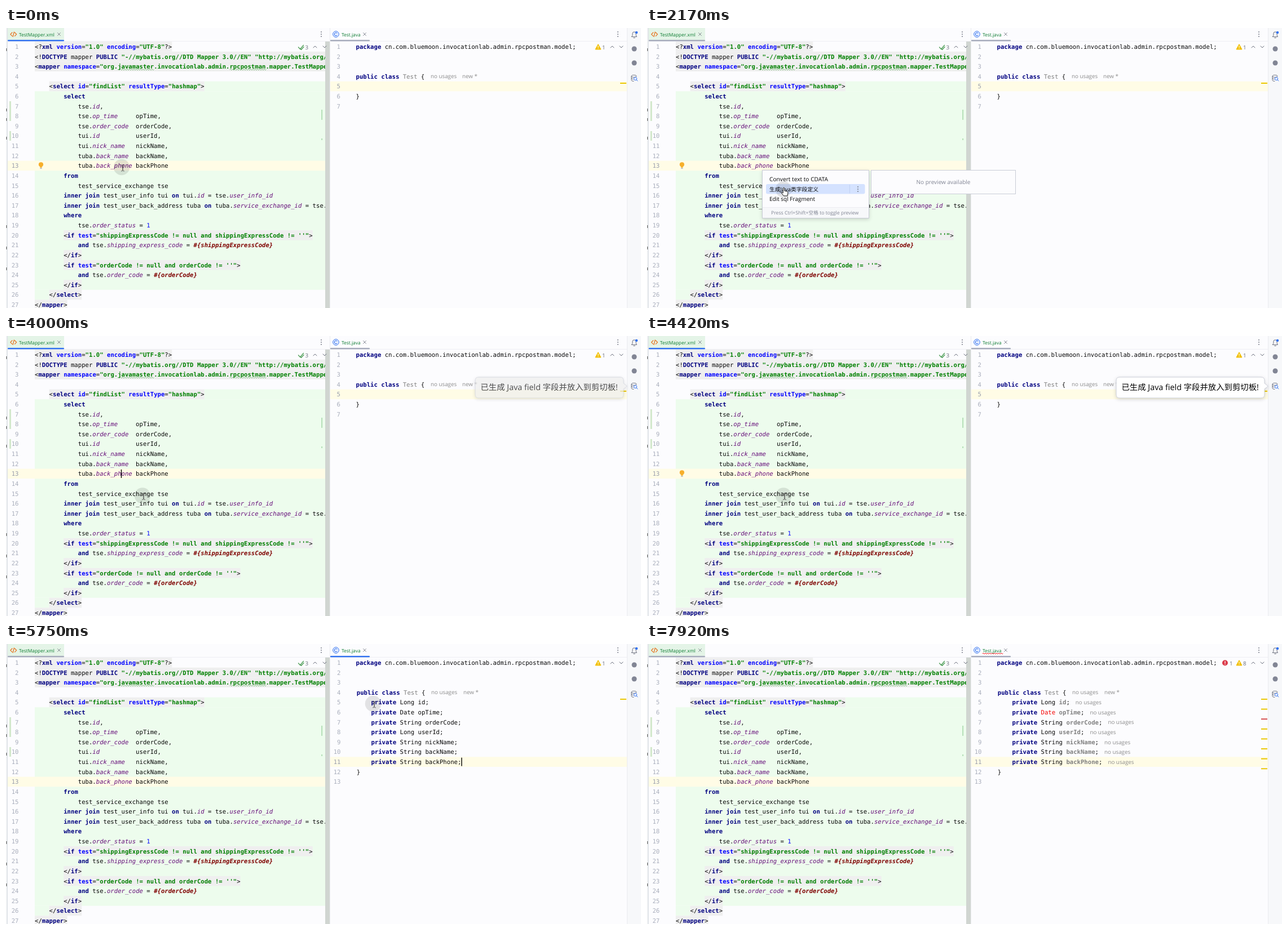
Recreate the animation shown at these times as an HTML page. Size 1126 px wide and 497 px high, loop 8080 ms.

```html
<!DOCTYPE html>
<html lang="en">
<head>
<meta charset="utf-8">
<title>Generate Java fields from a mapper query</title>
<style>
  html, body { margin: 0; width: 100%; height: 100%; overflow: hidden; background: #fcfcfe; }
  svg { display: block; width: 1126px; height: 497px; }
  text { white-space: pre; text-rendering: geometricPrecision; fill: #080808; }
  .code { font: 10.63px "DejaVu Sans Mono", monospace; }
  .ui { font-family: "Open Sans", "Noto Sans CJK SC", "Noto Sans CJK", sans-serif; }
  .number { fill: #a9aebc; text-anchor: end; }
  .current { fill: #989dab; }
  .hint { fill: #8c8c8c; font-size: 9.8px; }
  .tab { fill: #0a7b2f; font-size: 8.4px; }
  .keyword { fill: #000080; font-weight: bold; }
  .string { fill: #008000; font-weight: bold; }
  .attr { fill: #0000ff; font-weight: bold; }
  .column { fill: #660e7a; font-style: italic; }
  .param { fill: #7f0000; font-weight: bold; font-style: italic; }
  .digit { fill: #0000ff; }
  .unused { fill: #808080; }
  .analysed .field { fill: #808080; font-weight: bold; }
  .analysed .missing { fill: #f50000; }
  .line { fill: none; stroke: #6c707e; stroke-linecap: round; stroke-linejoin: round; }
</style>
</head>
<body>
<svg id="stage" viewBox="0 0 1126 497"></svg>
<script>
const LOOP = 8080, TICK = 250 / 3;
const CHAR = 6.4, ROW = 17.62;
const LEFT = 51, RIGHT = 620.5;

const mapperLines = `<?xml version="1.0" encoding="UTF-8"?>
<!DOCTYPE mapper PUBLIC "-//mybatis.org//DTD Mapper 3.0//EN" "http://mybatis.org/dtd/mybatis-3-mapper.dtd">
<mapper namespace="org.javamaster.invocationlab.admin.rpcpostman.mapper.TestMapper">

    <select id="findList" resultType="hashmap">
        select
            tse.id,
            tse.op_time     opTime,
            tse.order_code  orderCode,
            tui.id          userId,
            tui.nick_name   nickName,
            tuba.back_name  backName,
            tuba.back_phone backPhone
        from
            test_service_exchange tse
        inner join test_user_info tui on tui.id = tse.user_info_id
        inner join test_user_back_address tuba on tuba.service_exchange_id = tse.id
        where
            tse.order_status = 1
        <if test="shippingExpressCode != null and shippingExpressCode != ''">
            and tse.shipping_express_code = #{shippingExpressCode}
        </if>
        <if test="orderCode != null and orderCode != ''">
            and tse.order_code = #{orderCode}
        </if>
    </select>
</mapper>`.split('\n');

const fields = ['Long id', 'Date opTime', 'String orderCode', 'Long userId',
  'String nickName', 'String backName', 'String backPhone'].map(f => f.split(' '));

const SYNTAX = new RegExp([
  '(?<string>"[^"]*")',
  '(?<attr>\\w+(?==))',
  '(?<param>#\\{\\w+\\})',
  '(?<column>(?<=\\b(?:tse|tui|tuba)\\.)\\w+)',
  '(?<unused>(?<=class )\\w+)',
  '(?<keyword>\\b(?:xml|DOCTYPE|PUBLIC|(?<!DOCTYPE )mapper|if|select|from|inner|join|on|where|and|package|public|class|private)\\b)',
  '(?<digit>\\b\\d+\\b)'
].join('|'), 'g');

const escapeXml = s => s.replace(/&/g, '&amp;').replace(/</g, '&lt;');
const highlight = s => escapeXml(s).replace(SYNTAX, (word, ...rest) => {
  const groups = rest.at(-1);
  return `<tspan class="${Object.keys(groups).find(k => groups[k])}">${word}</tspan>`;
});

const rowY = n => 33 + (n - 1) * ROW;
const rect = (x, y, w, h, fill, extra = '') =>
  `<rect x="${x}" y="${y}" width="${w}" height="${h}" fill="${fill}" ${extra}/>`;
const path = (d, extra = '') => `<path class="line" d="${d}" ${extra}/>`;
const rawCode = (x, y, markup, cls = '') =>
  `<text class="code ${cls}" x="${x}" y="${y + 3.9}">${markup}</text>`;
const code = (x, y, s) => rawCode(x, y, highlight(s));
const ui = (x, y, s, size, extra = '') =>
  `<text class="ui" x="${x}" y="${y + size * .36}" style="font-size:${size}px;${extra}">${s}</text>`;
const hint = (x, row, s) => `<text class="ui hint" x="${x}" y="${rowY(row) + 3.6}">${s}</text>`;
const group = (id, content, extra = '') => `<g id="${id}" ${extra}>${content}</g>`;
const numbers = (x, count, current) => Array.from({ length: count }, (_, i) =>
  rawCode(x, rowY(i + 1), i + 1, i + 1 === current ? 'number current' : 'number')).join('');
const rowBand = (x, w, row, fill) => rect(x, rowY(row) - ROW / 2, w, ROW, fill);
const caret = (id, x, row) => group(id, rect(x, rowY(row) - 7.5, 1.4, 15, '#000'));
const dots = (x, y) => [-4, 0, 4].map(d => `<circle cx="${x}" cy="${y + d}" r=".9" fill="#6c707e"/>`).join('');
const cross = (x, y) => path(`M${x - 2.5} ${y - 2.5}l5 5m0-5l-5 5`, 'stroke-width=".8"');
const chevrons = (x1, x2) => path(`M${x1 - 3} 35l3-3 3 3M${x2 - 3} 32l3 3 3-3`);
const stripe = (y, fill) => rect(1089, y - 1, 11, 2, fill);
const wave = (x, y, w, stroke) => path(`M${x} ${y}` + 'q1-2 2 0t2 0'.repeat(Math.round(w / 4)),
  `style="stroke:${stroke};stroke-width:.9"`);

function mapperEditor() {
  const queryStart = LEFT + mapperLines[4].length * CHAR;
  let out = rowBand(queryStart, 574 - queryStart, 5, '#edfced') +
    rect(LEFT, rowY(6) - ROW / 2, 523, ROW * 20, '#edfced') +
    rowBand(LEFT, CHAR * 4, 26, '#edfced') + rowBand(3, 571, 13, '#fffce6');
  mapperLines.forEach((s, i) => {
    const indent = s.search(/\S/);
    if (s[indent] === '<')
      out += rowBand(LEFT + indent * CHAR, (s.length - indent) * CHAR, i + 1, '#efefef');
    out += code(LEFT, rowY(i + 1), s);
  });
  out += wave(198, 74, 64, '#7fbf7f') + wave(397, 74, 64, '#7fbf7f');
  return `<g clip-path="url(#leftPane)">${out}</g>` + numbers(22.5, 27, 13) +
    rect(6, 130, 3, 35, '#d3e8cc') + rect(6, 183, 3, 17, '#d3e8cc') +
    rect(559, 145, 2.2, 18, '#b9e2bb') + rect(559, 196, 2.2, 3, '#b9e2bb') +
    rect(566, 24, 8, 473, '#d0d5d1') + rect(574, 0, 1, 497, '#ebecf0') +
    path('M518.5 34l3 3.5 6-7m-5 7l1 1 4.5-5', 'style="stroke:#4f9e58;stroke-width:1.3"') +
    ui(530.5, 34.5, '3', 9.8, 'fill:#6c707e') + chevrons(548, 565);
}

function tabs() {
  return rect(3, 0, 100, 21, '#e4f4e7') + rect(3, 23, 1098, .8, '#ebecf0') +
    path('M11 8l-3.2 3.2 3.2 3.2m4.5-6.4l3.2 3.2-3.2 3.2m-1.2-7.4l-2 8.4', 'style="stroke:#e66d17;stroke-width:1.2"') +
    '<text class="ui tab" x="23" y="14.5">TestMapper.xml</text>' + cross(94, 11) + dots(559, 11) +
    '<circle cx="585" cy="11" r="5.3" fill="#edf3ff" stroke="#3574f0"/>' +
    path('M587 9.1a2.7 2.7 0 1 0 0 3.8', 'style="stroke:#3574f0;stroke-width:1.1"') +
    '<text class="ui tab" x="595" y="14.5">Test.java</text>' + cross(636, 11) + dots(1085, 11) +
    rect(3, 21, 100, 2.6, '#a8adbd', 'id="leftTab" rx="1.3"') +
    rect(575, 21, 70, 2.6, '#a8adbd', 'id="rightTab" rx="1.3"');
}

function javaEditor() {
  const head = x => code(x, rowY(4), 'public class Test {');
  const before = rowBand(575, 526, 5, '#fffce6') + numbers(593, 7, 5) + head(RIGHT) +
    code(RIGHT, rowY(6), '}') + hint(753, 4, 'no usages') + hint(809, 4, 'new *');
  const x = RIGHT + 1.3;
  let after = rowBand(575, 526, 11, '#fffce6') + numbers(593.5, 13, 11) + head(x) +
    code(x, rowY(12), '}') + hint(754, 4, 'no usages') + hint(811, 4, 'new *');
  let usages = '';
  fields.forEach(([type, name], i) => {
    const cls = type === 'Date' ? 'missing' : '';
    after += rawCode(x, rowY(5 + i), '    <tspan class="keyword">private</tspan> ' +
      `<tspan class="${cls}">${type}</tspan> <tspan class="field">${name}</tspan>;`);
    usages += hint(x + (14 + type.length + name.length) * CHAR + 10, 5 + i, 'no usages') +
      stripe(98 + (i + 1) * ROW, i === 1 ? '#d64f4f' : '#ebc700');
  });
  usages += '<circle cx="1025" cy="33.5" r="5" fill="#db3b4b"/>' + rect(1024.4, 30.5, 1.3, 3.8, '#fff') +
    rect(1024.4, 35.3, 1.3, 1.3, '#fff') + ui(1033, 34.5, '1', 9.8, 'fill:#6c707e') +
    wave(595, 17, 34, '#f50000');
  return group('before', before) + group('after', after) + code(RIGHT, rowY(1),
    'package cn.com.bluemoon.invocationlab.admin.rpcpostman.model;') + group('usages', usages) +
    stripe(98, '#ebc700') +
    '<path d="M1050 28.8l5 9.2h-10z" fill="#f2bf00" stroke="#f2bf00" stroke-linejoin="round"/>' +
    rect(1049.4, 31.5, 1.2, 3.3, '#fff') + rect(1049.4, 35.7, 1.2, 1.2, '#fff') +
    `<text id="warnings" class="ui" x="1057" y="38" style="font-size:9.8px;fill:#6c707e"></text>` + chevrons(1075, 1091);
}

function sideBars() {
  let out = rect(0, 0, 3, 497, '#f0f2f4') + rect(2.2, 0, .8, 497, '#d3d8dd');
  for (const y of [36, 143, 160, 193, 350, 388, 425]) out += rect(0, y, 1.4, 5, '#777');
  out += rect(1101, 0, 25, 497, '#f7f8fa') + rect(1101, 0, 1, 497, '#ebecf0') +
    path('M1109.5 15.5h9l-1.4-2.5v-3a3.1 3.1 0 0 0-6.2 0v3zm3.3 2h2.4') +
    '<circle cx="1118" cy="8" r="2.3" fill="#3574f0"/>' +
    '<circle cx="1114" cy="37" r="4.5" fill="#818594"/><circle cx="1114" cy="62" r="4.5" fill="#818594"/>' +
    path('M1109 85.5a4.5 2 0 0 1 9 0a4.5 2 0 0 1-9 0v7q0 2 4 2M1109 89q0 1.7 3 1.8') +
    '<circle cx="1116" cy="90" r="2.6" fill="#fff" stroke="#3574f0"/>' +
    path('M1118 92l2 2', 'style="stroke:#3574f0"');
  return out;
}

function popup() {
  const frame = 'stroke="#c9ccd6"';
  const opening = mapperLines[4].trim(), condition = mapperLines[19].trim();
  const diff = rect(397.5, 252.5, 533, 44, '#fcfcfe', frame) + rect(398, 274.5, 532, 1, '#dfe1e5') +
    rect(427, 253, opening.length * CHAR, 17, '#efefef') + rect(702, 253, 58, 17, '#bee6be') +
    rect(427, 276, 19.2, 17, '#bee6be') + rect(446.2, 276, condition.length * CHAR, 17, '#efefef') +
    rawCode(418.5, 261, 5, 'number') + rawCode(418.5, 284, 20, 'number') +
    code(427, 261, opening + '<![CDATA[') + code(427, 284, ']]>' + condition);
  const empty = rect(397.5, 252.5, 256, 42, '#fcfcfe', frame) +
    ui(525.5, 273, 'No preview available', 10, 'fill:#818594;text-anchor:middle');
  const menu = rect(204.5, 252.5, 189, 85, '#fcfcfe', frame + ' filter="url(#shadow)"') +
    rect(205, 318, 188, 19, '#f7f8fa') + rect(205, 318, 188, .8, '#ebecf0') +
    group('choice', rect(211, 259, 175.5, 17.5, '#d4e2ff', 'rx="3"') +
      rect(359, 260, .8, 15.5, '#bccdf0') + dots(374, 268)) +
    ui(217, 268, 'Convert text to CDATA', 10.2) + ui(217, 286, '生成Java类字段定义', 9.8) +
    ui(217, 303.5, 'Edit sql Fragment', 10) +
    ui(220, 328, 'Press Ctrl+Shift+空格 to toggle preview', 8.7, 'fill:#818594');
  return group('menu', menu) + group('diff', diff) + group('empty', empty);
}

const balloon = '<path id="bubble" d="M838 73h251q6 0 6 6v5l6.5 5-6.5 5v10q0 6-6 6h-251q-6 0-6-6v-25q0-6 6-6z" ' +
  'stroke="#c9ccd6" filter="url(#shadow)"/>' +
  ui(841.5, 91, '已生成 Java field 字段并放入到剪切板!', 14.36, 'fill:#000');

const bulb = '<circle cx="62" cy="242.3" r="4.1" fill="#f7af2b"/>' +
  rect(60.2, 245.5, 3.6, 2.2, '#f7af2b') + rect(60.4, 248.5, 3.2, 1, '#818594');

const pointer = '<circle cx="-2" cy="-1.5" r="14.3" fill="#000" opacity=".1"/>' +
  group('beam', path('M-2.5-5.5q2.5 0 2.5 1.5v8q0 1.5-2.5 1.5M2.5-5.5q-2.5 0-2.5 1.5v8q0 1.5 2.5 1.5',
    'style="stroke:#444;stroke-width:.8"')) +
  group('hand', '<path d="M-2.8-4q1.5-1.5 2.6 0v5l4.5 1q1.8.5 1.7 2.5l-1 5.5h-6.5l-4-5q-.4-1.8 1.2-1.3l1.5 1.3z" ' +
    'fill="#fff" stroke="#111" stroke-linejoin="round"/>');

const stage = document.getElementById('stage');
stage.innerHTML = `<defs><clipPath id="leftPane"><rect x="3" y="24" width="571" height="473"/></clipPath>
  <filter id="shadow" x="-10%" y="-30%" width="120%" height="170%">
    <feDropShadow dx="0" dy="2" stdDeviation="3" flood-opacity=".16"/></filter></defs>` +
  rect(0, 0, 1126, 497, '#fcfcfe') + mapperEditor() + javaEditor() + tabs() + sideBars() +
  group('bulb', bulb) + caret('leftCaret', 203.8, 13) + caret('clickCaret', 646.6, 5) +
  caret('pasteCaret', 807.3, 11) + popup() + group('balloon', balloon) + group('mouse', pointer);

const el = id => document.getElementById(id);
const show = (id, visible) => { el(id).style.display = visible ? '' : 'none'; };
const clamp = v => Math.min(1, Math.max(0, v));

const mousePath = [[0, 207, 248.5], [1590, 207, 248.5], [2170, 244, 288], [3600, 244, 288],
  [3670, 244, 285], [4420, 244, 285], [4960, 653, 107.5], [6050, 653, 107.5],
  [6830, 705, 140], [7580, 1010, 520], [LOOP, 1010, 520]];

function mouseAt(t) {
  const i = mousePath.findIndex(p => p[0] > t);
  const [t0, x0, y0] = mousePath[i - 1], [t1, x1, y1] = mousePath[i];
  const k = (t - t0) / (t1 - t0), s = k * k * (3 - 2 * k);
  return [x0 + (x1 - x0) * s, y0 + (y1 - y0) * s];
}

function draw(time) {
  const t = Math.floor((time % LOOP + 5) / TICK) * TICK;
  const within = (from, to) => t >= from && t < to;
  const menuOpen = within(830, 3660);
  const secondChoice = t >= 1910;
  const pasted = t >= 5745, analysed = t >= 6410;

  show('menu', menuOpen);
  show('diff', within(995, 1910));
  show('empty', within(1910, 3495));
  el('choice').setAttribute('transform', `translate(0 ${secondChoice ? 18 : 0})`);
  show('bulb', t < 3660 || within(4410, 5160));

  show('leftCaret', within(330, 830) || within(3660, 4160) || within(4660, 5160));
  show('clickCaret', within(5160, 5745));
  show('pasteCaret', within(5745, 6080) || within(6495, 6995) || within(7495, 7910));
  const leftFocus = !menuOpen && t < 5160;
  el('leftTab').setAttribute('fill', leftFocus ? '#3574f0' : '#a8adbd');
  el('rightTab').setAttribute('fill', within(5160, 7910) ? '#3574f0' : '#a8adbd');

  show('before', !pasted);
  show('after', pasted);
  show('usages', analysed);
  stage.classList.toggle('analysed', analysed);
  el('warnings').textContent = analysed ? '8' : '1';

  // The shadow shows through the bubble while it fades.
  const alpha = Math.min(clamp((t - 3770) / 330), clamp((5585 - t) / 330));
  show('balloon', alpha > 0);
  el('balloon').setAttribute('opacity', alpha);
  el('bubble').setAttribute('fill', alpha < 1 ? '#eee' : '#fff');

  const [x, y] = mouseAt(Math.min(t, LOOP - 1));
  el('mouse').setAttribute('transform', `translate(${x} ${y})`);
  const overMenu = menuOpen && t >= 1745;
  show('hand', overMenu);
  show('beam', !overMenu);
}

function frame() {
  draw(performance.now());
  requestAnimationFrame(frame);
}
frame();
</script>
</body>
</html>
```
